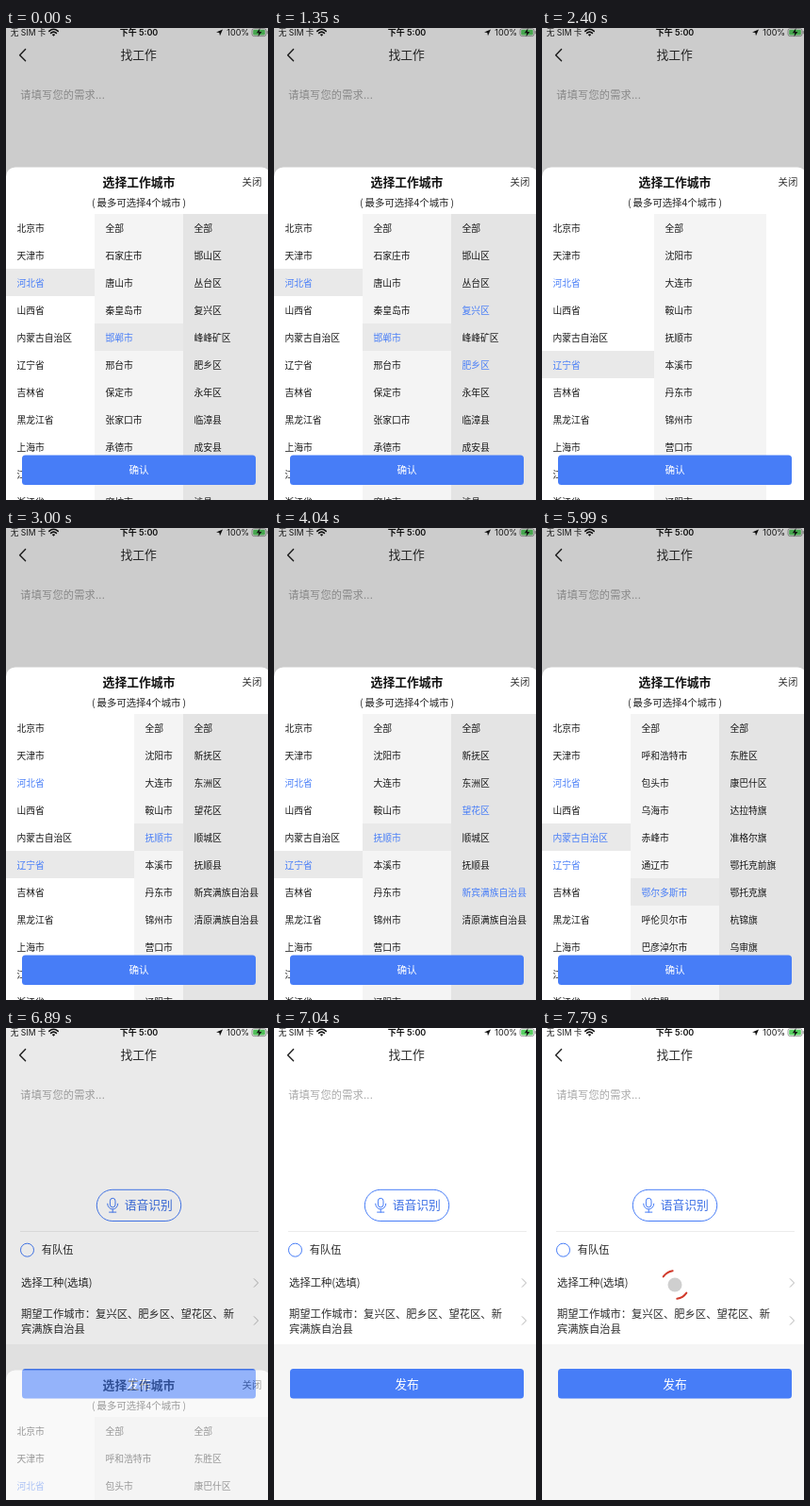
An HTML page for the animation above (8 s loop, 278x500 px).

```html
<!DOCTYPE html>
<html lang="zh-CN">
<head>
<meta charset="utf-8">
<style>
html, body { margin: 0; width: 100%; height: 100%; overflow: hidden; background: #fff; }
svg { display: block; width: 278px; height: 500px; font-family: "Noto Sans CJK SC", "Noto Sans CJK", "Noto Sans", sans-serif; }
.latin { font-family: Inter, "Noto Sans CJK SC", "Noto Sans CJK", sans-serif; }
</style>
</head>
<body>
<svg id="stage" viewBox="0 0 278 500" xmlns="http://www.w3.org/2000/svg">
  <g id="page"></g>
  <g id="modal">
    <rect width="278" height="500" opacity=".2"/>
    <g id="sheet">
      <path d="M0 500V157.4a10 10 0 0 1 10-10H271a10 10 0 0 1 10 10V500z" fill="#fff"/>
      <g id="heading"></g>
      <g id="columns"></g>
      <g id="confirm"></g>
    </g>
  </g>
  <g id="spinner">
    <circle cx="141" cy="272" r="7.5" fill="#cfcfcf"/>
    <path id="arcs" fill="none" stroke="#d13a2b" stroke-width="2" stroke-linecap="round"/>
  </g>
</svg>
<script>
const LOOP = 8000, LEAVE = 6890, CLOSED = 7040, LOADING = 7640;
const ROW = 29, LIST_TOP = 197;
const BLUE = '#477df7', INK = '#161616', SOFT_INK = '#2c2c2c';
const $ = id => document.getElementById(id);

// Text placed by its vertical centre
const text = (str, x, cy, size, fill = INK, extra = '') =>
  `<text x="${x}" y="${cy + size * 0.37}" font-size="${size}" fill="${fill}" ${extra}>${str}</text>`;
const centred = (str, x, cy, size, fill, extra = '') =>
  text(str, x, cy, size, fill, `text-anchor="middle" ${extra}`);
const box = (x, y, w, h, fill, rx = 0) =>
  `<rect x="${x}" y="${y}" width="${w}" height="${h}" rx="${rx}" fill="${fill}"/>`;
const line = (d, stroke, width = 1) =>
  `<path d="${d}" fill="none" stroke="${stroke}" stroke-width="${width}" stroke-linecap="round" stroke-linejoin="round"/>`;

const statusBar =
  text('无 SIM 卡', 4.8, 4.8, 8.6, INK, 'class="latin"') +
  line('M45.8 3.4Q50.5 -1 55.2 3.4M47.6 5.4Q50.5 2.8 53.4 5.4', '#111', 1.5) +
  '<path d="M48.8 6.9Q50.5 5.6 52.2 6.9L50.5 8.8z" fill="#111"/>' +
  centred('下午 5:00', 141, 4.8, 9, '#111', 'class="latin" font-weight="600"') +
  '<path d="M230 1.4L227 8.2L226.3 5.1L223 4.5z" fill="#111"/>' +
  text('100%', 234.3, 4.8, 9, INK, 'class="latin"') +
  '<rect x="261" y=".6" width="15" height="8" rx="2.2" fill="none" stroke="#8a8a8a" stroke-width=".8"/>' +
  box(262.2, 1.8, 12.6, 5.6, '#58cf62', 1.2) +
  box(276.7, 3, 1, 3.2, '#8a8a8a', .5) +
  '<path d="M269.6 0L265.8 5.2H268.3L267.4 9.3L271.4 3.9H268.8z" fill="#111"/>';

const mic =
  '<rect x="110.4" y="180.3" width="5.6" height="9.6" rx="2.8" fill="none" stroke="#477df7"/>' +
  line('M107.7 186.2a5.5 5.8 0 0 0 11 0M113.2 192.1V195.1M109.6 195.1H116.8', BLUE);

$('page').innerHTML =
  box(0, 0, 278, 500, '#fff') +
  box(0, 335, 278, 165, '#f5f5f5') +
  statusBar +
  line('M20.6 22.6L14.6 28.7L20.6 34.8', '#222', 1.4) +
  centred('找工作', 140.7, 28.4, 12.8, SOFT_INK) +
  text('请填写您的需求...', 15.3, 71, 11.2, '#a9a9a9', 'letter-spacing=".2"') +
  '<rect x="96.3" y="171.3" width="89.4" height="33.2" rx="16.6" fill="none" stroke="#477df7"/>' +
  mic +
  text('语音识别', 125.7, 187.5, 12.8, '#3f72e6') +
  box(15, 215, 253, 1, '#ececec') +
  '<circle cx="22.5" cy="235.2" r="7" fill="none" stroke="#477df7"/>' +
  text('有队伍', 37.8, 235.3, 11.2, SOFT_INK) +
  text('选择工种(选填)', 16.1, 270.3, 11.3, SOFT_INK) +
  text('期望工作城市：复兴区、肥乡区、望花区、新', 16, 302.5, 11.3, SOFT_INK) +
  text('宾满族自治县', 16, 318.5, 11.3, SOFT_INK) +
  [270, 310].map(y => line(`M263.3 ${y - 4.3}L267.5 ${y}L263.3 ${y + 4.3}`, '#b4b4b4')).join('') +
  box(17, 361, 248, 31.5, BLUE, 3.5) +
  centred('发布', 141, 376.8, 12.8, '#fff');

$('heading').innerHTML =
  centred('选择工作城市', 141, 163.6, 12.8, '#111', 'font-weight="700"') +
  centred('(\u2009最多可选择4个城市\u2009)', 141, 185, 10.4, '#222', 'font-weight="500"') +
  text('关闭', 250.6, 162.7, 10.4, '#333');
$('confirm').innerHTML =
  box(17, 452.6, 248, 31.4, BLUE, 3.5) + centred('确认', 141, 468.2, 10.6, '#fff');

const provinces = '北京市 天津市 河北省 山西省 内蒙古自治区 辽宁省 吉林省 黑龙江省 上海市 江苏省 浙江省'.split(' ');
const region = (chosen, cities, city, areas) =>
  ({ chosen, cities: cities.split(' '), city, areas: areas.split(' ') });

const hebei = region([2],
  '全部 石家庄市 唐山市 秦皇岛市 邯郸市 邢台市 保定市 张家口市 承德市 沧州市 廊坊市', 4,
  '全部 邯山区 丛台区 复兴区 峰峰矿区 肥乡区 永年区 临漳县 成安县 大名县 涉县');
const liaoning = region([2, 5],
  '全部 沈阳市 大连市 鞍山市 抚顺市 本溪市 丹东市 锦州市 营口市 阜新市 辽阳市', 4,
  '全部 新抚区 东洲区 望花区 顺城区 抚顺县 新宾满族自治县 清原满族自治县');
const mongolia = region([2, 5, 4],
  '全部 呼和浩特市 包头市 乌海市 赤峰市 通辽市 鄂尔多斯市 呼伦贝尔市 巴彦淖尔市 乌兰察布市 兴安盟', 6,
  '全部 东胜区 康巴什区 达拉特旗 准格尔旗 鄂托克前旗 鄂托克旗 杭锦旗 乌审旗 伊金霍洛旗');

// start time, region, left of column 2, right of column 2, chosen areas (null: no third column), third column fill
const steps = [
  [0, hebei, 94, 188, []],
  [750, hebei, 94, 188, [3]],
  [1350, hebei, 94, 188, [3, 5]],
  [2400, liaoning, 119, 238, null],
  [2550, liaoning, 139, 278, null],
  [3000, liaoning, 136, 188, []],
  [3150, liaoning, 94, 188, []],
  [3450, liaoning, 94, 188, [3]],
  [4040, liaoning, 94, 188, [3, 6]],
  [5240, mongolia, 105, 210, null],
  [5390, mongolia, 139, 278, null],
  [5840, mongolia, 137, 188, []],
  [5990, mongolia, 94, 188, []],
  [LEAVE, mongolia, 94, 188, [], '#f4f4f4']
];

function column(items, left, right, fill, chosen, active) {
  let out = box(left, LIST_TOP, right - left, 303, fill);
  if (active !== undefined) out += box(left, LIST_TOP + active * ROW, right - left, ROW, '#e9e9e9');
  items.forEach((name, i) => {
    out += text(name, left + 11.4, LIST_TOP + (i + .5) * ROW + .6, 9.8, chosen.includes(i) ? BLUE : INK);
  });
  return out;
}

function drawColumns([, place, left, right, areas, areaFill = '#e4e4e4']) {
  const { chosen, cities, city } = place;
  let out = column(provinces, 0, left, '#fff', chosen, chosen[chosen.length - 1]);
  out += areas
    ? column(cities, left, right, '#f4f4f4', [city], city) +
      column(place.areas, right, 278, areaFill, areas)
    : column(cities, left, right, '#f4f4f4', []);
  $('columns').innerHTML = out;
}

// Two opposite arcs, angles in degrees
function arcPair(from, to) {
  const point = deg => {
    const a = deg * Math.PI / 180;
    return `${141 + 15 * Math.cos(a)} ${272 + 15 * Math.sin(a)}`;
  };
  return [0, 180].map(turn => `M${point(from + turn)}A15 15 0 0 1 ${point(to + turn)}`).join('');
}

let shown;
function render(t) {
  const step = steps.filter(s => s[0] <= t).pop();
  if (step !== shown) drawColumns(shown = step);

  const leaving = t >= LEAVE;
  $('modal').setAttribute('display', t >= CLOSED ? 'none' : 'inline');
  $('modal').setAttribute('opacity', leaving ? .42 : 1);
  $('sheet').setAttribute('transform', `translate(0 ${leaving ? 215 : 0})`);

  $('spinner').setAttribute('display', t >= LOADING ? 'inline' : 'none');
  $('arcs').setAttribute('d', t >= LOADING + 150 ? arcPair(215, 261) : arcPair(279, 323));
}

function tick() {
  render(performance.now() % LOOP);
  requestAnimationFrame(tick);
}
tick();
</script>
</body>
</html>
```
